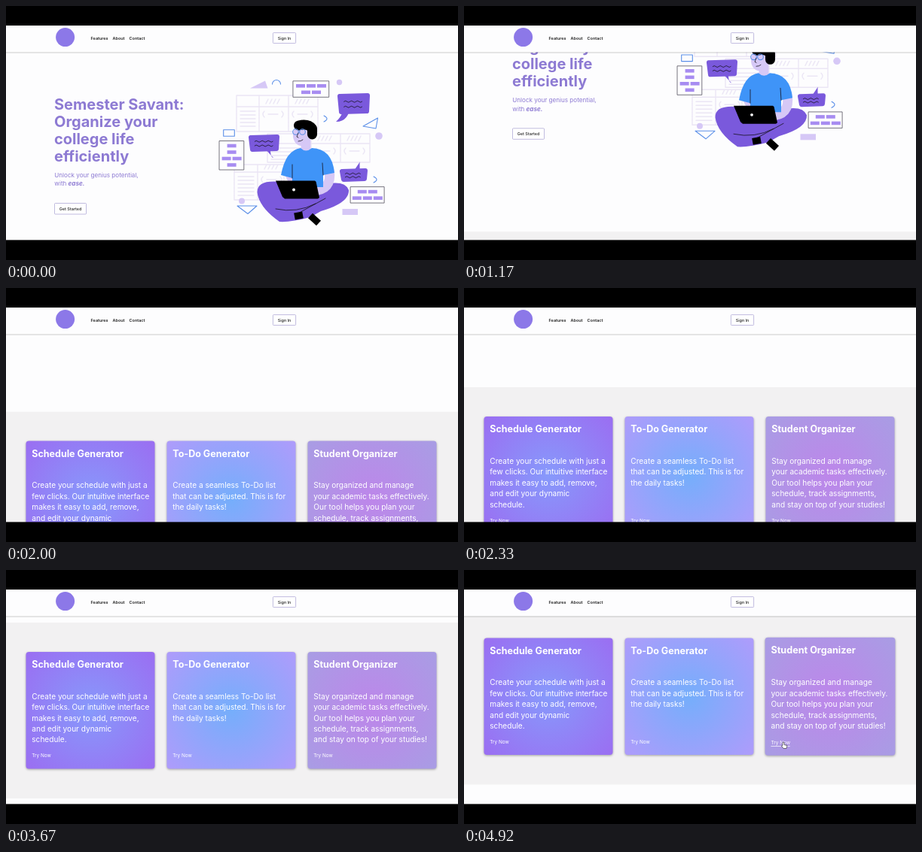
An HTML page for the animation above (5 s loop, 600 px wide and 338 px high).

```html
<!DOCTYPE html>
<html lang="en">
<head>
<meta charset="utf-8">
<title>Study planner</title>
<style>
  html, body { margin: 0; width: 100%; height: 100%; overflow: hidden; background: #000; }
  svg { display: block; width: 100%; height: 100%; font-family: Inter, "Open Sans", sans-serif; }
  #hero { fill: #8d7ad3; }
  .title { font-size: 20px; font-weight: 700; }
  .sub { font-size: 8.1px; }
  .ui { font-size: 5.45px; font-weight: 500; fill: #222; }
  .nav { font-weight: 600; }
  .button { fill: #fff; stroke: #a79fd2; stroke-width: .7; }
  .card { filter: drop-shadow(0 1.5px 1.5px #0005); fill: #fff; }
  .head { font-size: 12.5px; font-weight: 700; }
  .body { font-size: 10.1px; }
  .link { font-size: 6.4px; }
  .grid, .blue, .ink, .frame, .limb { fill: none; stroke-linecap: round; stroke-linejoin: round; }
  .grid { stroke: #ebe6f5; stroke-width: 1.4; }
  .blue { stroke: #5b8fe8; stroke-width: 1.1; }
  .ink { stroke: #17131f; stroke-width: .8; }
  .frame { fill: #fdfdfe; stroke: #55525f; stroke-width: .8; }
  .brick { fill: #a78cf1; }
  .pale { fill: #d6c8f6; }
  .violet { fill: #7a59dc; }
  .bubble { stroke: #7a59dc; stroke-width: 6; stroke-linejoin: round; }
  .limb { stroke: #d6c8f6; stroke-width: 13; }
  .black { stroke: #000; }
  .shirt { fill: #3f94f8; }
</style>
</head>
<body>
<svg viewBox="0 0 600 338">
  <defs id="defs"></defs>
  <rect y="26" width="600" height="286" fill="#fdfdfe"/>
  <g id="page">
    <rect y="400" width="600" height="234" fill="#f2f1f2"/>
    <g id="hero"></g>
    <rect class="button" x="64.5" y="262.5" width="42" height="14.5" rx="1"/>
    <text class="ui" x="85.6" y="271.6" text-anchor="middle">Get Started</text>
    <g id="art"></g>
    <g id="cards"></g>
  </g>
  <rect y="26" width="600" height="35.5" fill="#fdfdfe"/>
  <rect y="61.5" width="600" height="1" fill="#0003"/>
  <circle cx="78.6" cy="41.6" r="12.5" fill="#8c78e8"/>
  <g class="ui nav">
    <text x="112.6" y="45">Features</text>
    <text x="141.6" y="45">About</text>
    <text x="163.6" y="45">Contact</text>
  </g>
  <rect class="button" x="354.4" y="35.6" width="30.2" height="14" rx="1"/>
  <text class="ui" x="369.5" y="44.6" text-anchor="middle">Sign In</text>
  <g id="cursor" fill="#fff" stroke="#222" stroke-width=".6" stroke-linejoin="round">
    <path id="arrow" d="M0 0V9L2 7H6Z"/>
    <path id="hand" d="M-1 0Q0-1 1 0V3L5 4 4 8H0L-2.6 4.6-1 4Z"/>
  </g>
  <rect width="600" height="26"/>
  <rect y="311.4" width="600" height="27"/>
</svg>
<script>
const $ = id => document.getElementById(id);
const repeat = (n, make) => Array.from({ length: n }, (_, i) => make(i)).join('');
const path = (cls, d) => `<path class="${cls}" d="${d}"/>`;
const box = (cls, x, y, w, h, extra = '') =>
  `<rect class="${cls}" x="${x}" y="${y}" width="${w}" height="${h}" ${extra}/>`;
const dot = (cls, x, y, r) => `<circle class="${cls}" cx="${x}" cy="${y}" r="${r}"/>`;
const lines = (cls, x, y, step, rows) =>
  rows.map((row, i) => `<text class="${cls}" x="${x}" y="${y + i * step}">${row}</text>`).join('');

$('hero').innerHTML =
  lines('title', 64, 138, 23, ['Semester Savant:', 'Organize your', 'college life', 'efficiently']) +
  lines('sub', 64.3, 227.8, 11.6, ['Unlock your genius potential,',
    'with <tspan x="82.5" font-weight="700" font-style="italic">ease.</tspan>']);

// Planner table: text lines in the first column, slashes and braces in the others
function table(x, y, w, h, head, columns) {
  const first = columns[0] - x - 10, top = y + head + 6;
  return path('grid', `M${x} ${y}h${w}v${h}h${-w}ZM${x} ${y + head}h${w}` +
    columns.map(c => `M${c} ${y}v${h}` + repeat(4, i => `M${c + 9 + i * 5} ${y + head - 4}l3-6`) +
      `M${c + 7} ${top}q-4 4 0 8m5-4h13m5-4q4 4 0 8`).join('') +
    repeat(Math.floor((h - head) / 6), i => `M${x + 5} ${top + i * 5}h${first}`));
}

// Framed rows of bricks, each row centred
function bricks(x, y, w, rows) {
  return box('frame', x, y, w, rows.length * 8.5 + 4.5) + rows.map((n, row) =>
    repeat(n, i => box('brick', x + w / 2 + (i - n / 2) * 14 + 1, y + 4.2 + row * 8.5, 12, 4.6))).join('');
}

function bubble(x, y, w, h, base, tipX, tipY) {
  const right = x + w, bottom = y + h, mid = y + h / 2;
  const squiggle = row => `M${x + w * .2} ${y + h * row}q2-2 4 0` + 't4 0'.repeat(w * .6 / 4 - 1);
  return path('violet bubble', `M${x + 3} ${y + 4}L${right - 3} ${y + 3} ${right - 4} ${bottom - 4} ${x + 5} ${bottom - 3}Z`) +
    path('violet', `M${base - 6} ${mid}Q${base} ${(mid + tipY) / 2} ${tipX} ${tipY}Q${base + 5} ${tipY} ${base + 6} ${mid}Z`) +
    path('ink', squiggle(.4) + squiggle(.65));
}

const backdrop =
  table(306, 119, 108, 48, 15, [336, 375]) +
  table(347, 170, 136, 38, 13, [405, 444]) +
  table(303, 211, 66, 47, 10, [334]);

const ornaments =
  path('pale', 'M324 109.5L344 99.5 347.5 109.5Z') +
  dot('pale', 442.5, 101.5, 3.7) + dot('pale', 495, 173, 4.8) + dot('pale', 313, 259.5, 4) +
  box('pale', 446.5, 270, 20.5, 8) + box('blue', 288.7, 164.7, 14.6, 8.6) +
  path('blue', 'M353.5 104a5.5 5.5 0 0 1 11 0M422 146q8 4 0 8M488 227q8 4 0 8') +
  path('blue', 'M474 160L493.5 149 491 163ZM307 266H333L321 276.5Z') +
  bricks(381.3, 99.8, 47.4, [3, 2]) + bricks(283.4, 179.5, 32.4, [1, 1, 2, 1]) +
  bricks(457.5, 240.6, 44.6, [2, 3]) +
  bubble(440, 116, 43, 28, 451, 438, 154) + bubble(322, 171, 41, 23, 345, 355, 202) +
  bubble(443, 216, 37, 18, 464, 470, 207);

const person =
  path('violet', 'M372 235Q333 229 333.5 248 336 268 363 287 378 288 404 281L418 273Q456 262 455 245 450 232 425 237Z') +
  path('ink', 'M358 270Q386 276 411 263M384 278L424 256') +
  `<g stroke-width="9">${path('black', 'M383 280l11-2M404 279l11 10')}</g>` +
  path('limb', 'M375 220L384 238M429 218Q434 246 405 246M398 180V194') +
  path('shirt', 'M391 189Q371 192 365 225L380 229V241H421V225L436 222Q433 190 406 189 398 196 391 189Z') +
  path('ink', 'M380 229V211M421 225L420 209') +
  '<ellipse class="pale" cx="392" cy="172" rx="11" ry="14"/>' +
  path('limb black', 'M388.5 159Q401 156 406.5 163V171') +
  dot('blue', 384.5, 167.5, 3.8) + dot('blue', 393.5, 167.5, 3.8) + path('ink', 'M388 169l-2 5 2 1M388 180q4 0 6-2') +
  path('laptop', 'M358 232.5H410Q412 233 412 236L416 255 414 256.5H370L367 254Z') +
  '<circle cx="382" cy="244.5" r="1.9" fill="#fff"/>';

$('art').innerHTML = backdrop + ornaments + person;

// Cards
const cards = [
  ['Schedule Generator', '#8799fb', '#9a6ff2', ['Create your schedule with just a', 'few clicks. Our intuitive interface',
    'makes it easy to add, remove,', 'and edit your dynamic', 'schedule.']],
  ['To-Do Generator', '#75aefb', '#ad9cfb', ['Create a seamless To-Do list', 'that can be adjusted. This is for', 'the daily tasks!']],
  ['Student Organizer', '#bd86ea', '#a99ce4', ['Stay organized and manage', 'your academic tasks effectively.',
    'Our tool helps you plan your', 'schedule, track assignments,', 'and stay on top of your studies!']],
];
cards.forEach(([head, inner, outer, body], i) => {
  const x = 26.5 + i * 187, textX = x + 7.8;
  $('defs').innerHTML += `<radialGradient id="glow${i}" gradientUnits="userSpaceOnUse" cx="${x + 85.5}" cy="517" r="112">
    <stop stop-color="${inner}"/><stop offset="1" stop-color="${outer}"/></radialGradient>`;
  $('cards').innerHTML += `<g class="card" id="card${i}">` +
    box('', x, 439, 171, 155.5, `rx="4" fill="url(#glow${i})"`) +
    lines('head', textX, 460, 0, [head]) + lines('body', textX, 501.7, 14.45, body) +
    lines('link', textX, 579.5, 0, ['Try Now']) + '</g>';
});
$('card2').innerHTML += box('', 408.3, 582, 25, .7, 'id="underline"');

// Motion
const LOOP = 5000, FPS = 12;
const scrollKeys = [[0, 0], [170, 0], [830, 52], [1580, 170], [2330, 268], [3080, 285], [3670, 330.5],
  [4250, 348.5], [LOOP, 348.5]];
const slope = i => {
  const [a, b] = [scrollKeys[i], scrollKeys[i + 1]];
  return a && b ? (b[1] - a[1]) / (b[0] - a[0]) : 0;
};
// Harmonic-mean tangents keep the curve smooth without overshoot.
const tangent = i => {
  const a = slope(i - 1), b = slope(i);
  return a * b > 0 ? 2 * a * b / (a + b) : 0;
};
function scrollAt(t) {
  const i = scrollKeys.findIndex(key => key[0] > t) - 1;
  const [t0, y0] = scrollKeys[i], [t1, y1] = scrollKeys[i + 1];
  const d = t1 - t0, u = (t - t0) / d, v = 1 - u;
  return v * v * (1 + 2 * u) * y0 + u * u * (3 - 2 * u) * y1 + d * u * v * (v * tangent(i) - u * tangent(i + 1));
}
const ramp = (t, from, to) => {
  const u = Math.min(1, Math.max(0, (t - from) / (to - from)));
  return u * u * (3 - 2 * u);
};
const mix = (a, b, u) => a + (b - a) * u;
const show = (id, on) => $(id).setAttribute('visibility', on ? 'inherit' : 'hidden');

function draw(t) {
  $('page').setAttribute('transform', `translate(0 ${-scrollAt(t)})`);
  const move = ramp(t, 4250, 4830), overLink = move > .95;
  const grow = 1 + .011 * ramp(t, 4250, 4580);
  $('card2').setAttribute('transform', `translate(486 517) scale(${grow}) translate(-486 -517)`);
  $('cursor').setAttribute('transform', `translate(${mix(577, 424, move)} ${mix(205, 229.5, move)})`);
  show('cursor', t >= 4160);
  show('arrow', !overLink);
  show('hand', overLink);
  show('underline', overLink);
}
function tick() {
  const step = Math.floor((performance.now() % LOOP + 4) * FPS / 1000) % (LOOP * FPS / 1000);
  draw(Math.floor(step * 100 / FPS) * 10);
  requestAnimationFrame(tick);
}
tick();
</script>
</body>
</html>
```
